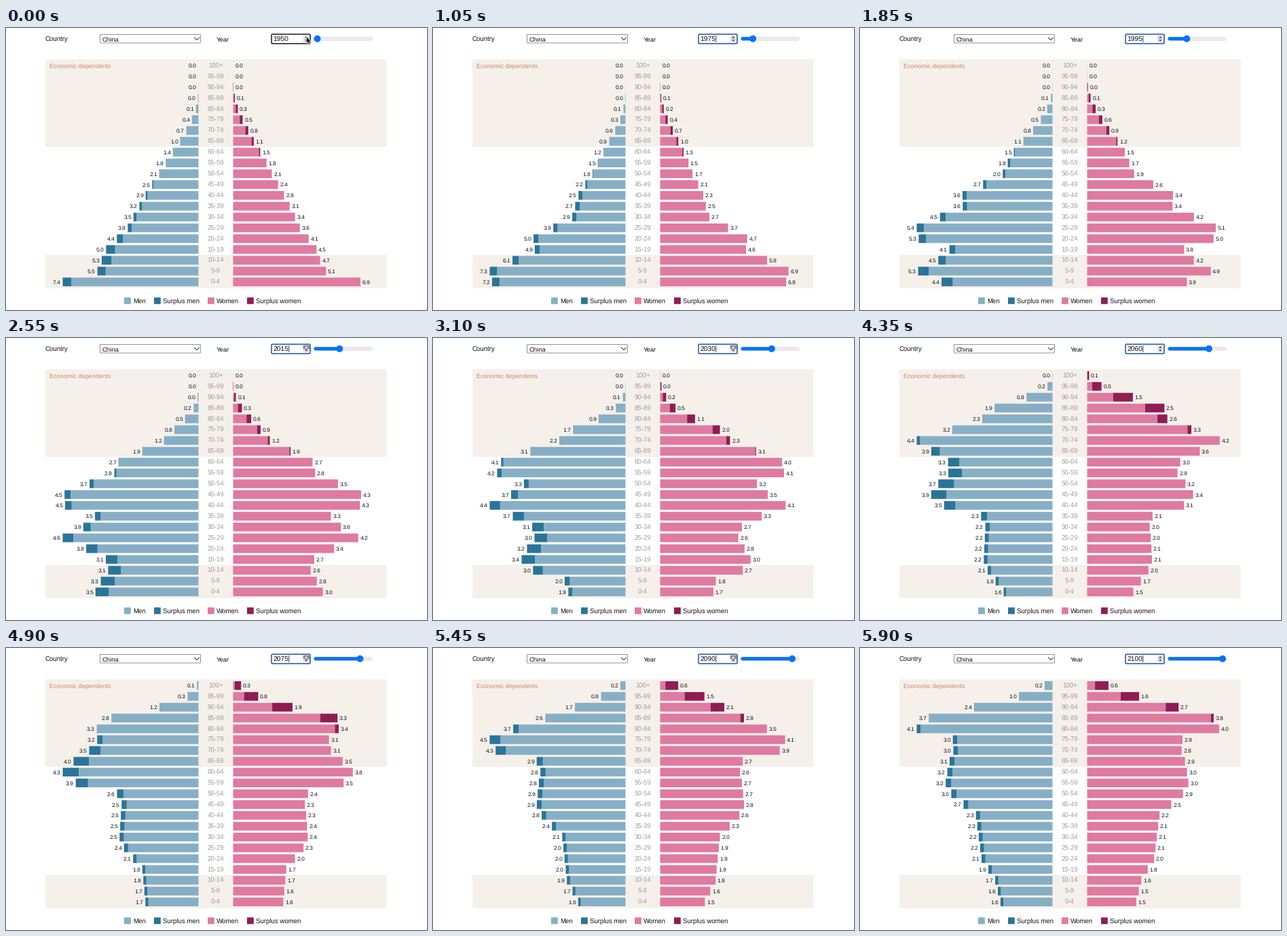
Write a matplotlib script that moves like this. It is 620x415 px and loops after 6050 ms.

```python
import numpy as np
import matplotlib.pyplot as plt
from matplotlib.animation import FuncAnimation
from matplotlib.patches import Circle, FancyBboxPatch, Polygon, Rectangle

W, H, DPI = 620, 415, 100
STEP, LOOP = 50, 6050
FIRST, BEAT = 144, 196.35       # first five-year step and pace, ms
AGES = 21
MEN_X, WOMEN_X, MAX_BAR = 283.5, 334.5, 200
BLUE, NAVY, PINK, WINE = "#86afc5", "#2b7499", "#df7aa1", "#8f1d54"
PANEL, INK, ACCENT = "#f5f0ea", "#111111", "#0a72f5"

# Turning points of the male birth cohorts: (year, millions).
BIRTHS = [(1870, 9), (1885, 10.5), (1900, 14), (1925, 21.8), (1935, 28.2),
          (1945, 30.7), (1950, 41.2), (1955, 51), (1960, 49), (1965, 59.5),
          (1970, 69.8), (1975, 67), (1980, 51.5), (1985, 57), (1990, 67),
          (1995, 55.3), (2000, 45.6), (2005, 44.4), (2010, 48),
          (2015, 50.6), (2020, 45), (2025, 29.6), (2030, 27.8),
          (2045, 28.4), (2050, 26.8), (2060, 20.2), (2080, 18.7),
          (2090, 15.1), (2100, 13.7)]


def bump(x, centre, width):
    return np.exp(-((x - centre) / width) ** 2)


def pyramid(year):
    """Shares (%) of men and women by age group: births times survival."""
    age = 5 * np.arange(AGES)
    born = year - age
    boys = np.interp(born, *zip(*BIRTHS))
    girls = boys * (.945 - .09 * bump(born, 2008, 16)
                    - .05 * bump(born, 1938, 9))

    # Extra losses up to 1975, then Gompertz mortality that eases over time.
    hard = .0045 * np.maximum(min(year, 1975) - np.maximum(born, 1950), 0)
    era = max(year, 1975)
    slope = .09 + .00032 * (era - 1975)
    gain = .145 * (era - 2025)

    def alive(extra):
        risk = 2.5 * np.exp(slope * (age + 2.5 - gain - extra - 90))
        return np.exp(-risk - hard)

    people = np.array([boys * alive(0), girls * alive(3.5)])
    return 100 * people / people.sum()


def steps_done(t):
    return int((t - FIRST) // BEAT) + 1 if t >= FIRST else 0


plt.rcParams["font.family"] = "Liberation Sans"
plt.rcParams["text.hinting"] = "none"
fig = plt.figure(figsize=(W / DPI, H / DPI), dpi=DPI, facecolor="white")
ax = fig.add_axes([0, 0, 1, 1])
ax.set_xlim(0, W)
ax.set_ylim(H, 0)
ax.axis("off")


def px(size):
    return size * 72 / DPI


def label(x, yc, s, size, color=INK, ha="left"):
    """Text whose digits are centred on yc."""
    return ax.text(x, yc + .36 * size, s, fontsize=px(size), color=color,
                   ha=ha, va="baseline", zorder=5)


def box(x, y, w, h, color, z=2):
    return ax.add_patch(Rectangle((x, y), w, h, fc=color, lw=0, zorder=z,
                                  snap=False))


def rounded(x, y, w, h, r, fc, ec="none", lw=0, z=3):
    style = f"round,pad=0,rounding_size={r}"
    return ax.add_patch(FancyBboxPatch((x, y), w, h, boxstyle=style, fc=fc,
                                       ec=ec, lw=px(lw), zorder=z))


def shape(points, fc, ec="none", lw=0, z=6):
    return ax.add_patch(Polygon(points, closed=True, fc=fc, ec=ec,
                                lw=px(lw), zorder=z))


# Controls
label(58, 16, "Country", 9.7)
rounded(138.5, 9.5, 148, 12.5, 1, "white", "#929292", 1)
label(141.8, 16, "China", 9.5)
ax.plot([277.5, 281, 284.5], [14.2, 17.6, 14.2], color="#333333",
        lw=px(1), zorder=5)
label(310, 16, "Year", 9.5)
field = rounded(391, 9.2, 57, 13.8, 1.5, "white", "#333333", 1.7)
year_text = label(393.5, 16, "", 10.2)
caret = box(416.3, 11, .9, 10, "#222222", 5)
rounded(437.5, 10.7, 9.5, 10.4, 1.5, "#e4e4e4", z=4)
pressed = rounded(437.5, 10.7, 9.5, 5.6, 1.5, "#8c8c8c", z=5)
up = shape([(440, 14.8), (444.4, 14.8), (442.2, 12.2)], "#444444")
shape([(440, 17.2), (444.4, 17.2), (442.2, 19.8)], "#444444")
cursor = shape([(442.5, 12.5), (442.5, 23), (444.8, 20.9), (446.4, 24.6),
                (448, 23.9), (446.4, 20.4), (449.4, 20.2)],
               "black", "white", .7, 9)

rounded(453.5, 13.3, 86, 5, 2.5, "#ebebeb", "#dddddd", .6)
fill = rounded(453.5, 13.2, 5, 5.2, 2.5, ACCENT, z=4)
thumb = ax.add_patch(Circle((458.5, 15.8), 5, fc=ACCENT, lw=0, zorder=5))

# Chart
box(58, 46, 502.5, 129, PANEL, 1)
box(58, 334, 502.5, 49, PANEL, 1)
label(64, 56.2, "Economic dependents", 9.1, "#cd8a6c")

rows = []
for a in range(AGES):
    y = 373.7 - 15.92 * a
    name = "100+" if a == AGES - 1 else f"{5 * a}-{5 * a + 4}"
    label(309, y, name, 9.7, "#a0a0a0", "center")
    bars = [box(0, y - 6.4, 0, 12.8, c) for c in (BLUE, NAVY, PINK, WINE)]
    rows.append((bars, label(0, y, "", 8.5, ha="right"),
                 label(0, y, "", 8.5)))

for x, color, name in [(174, BLUE, "Men"), (218, NAVY, "Surplus men"),
                       (297, PINK, "Women"), (355, WINE, "Surplus women")]:
    box(x, 396.5, 9.8, 9.8, color)
    label(x + 13, 401.3, name, 9.7)


def place(bar, x0, x1):
    bar.set_x(x0)
    bar.set_width(x1 - x0)


def draw(i):
    t = i * STEP
    n = steps_done(t)
    year = 1950 + 5 * n

    year_text.set_text(str(year))
    field.set_edgecolor("#3566b4" if n else "#333333")
    caret.set_visible(n > 0)
    cursor.set_visible(n == 0)
    down = n != steps_done(t - STEP)
    pressed.set_visible(down)
    up.set_facecolor("white" if down else "#444444")
    knob = 458.5 + 75.5 * (year - 1950) / 150
    thumb.center = (knob, 15.8)
    fill.set_width(knob - 453.5)

    men, women = pyramid(year)
    scale = MAX_BAR / max(men.max(), women.max())
    for (bars, left, right), m, w in zip(rows, men, women):
        common = min(m, w) * scale
        end_m, end_w = MEN_X - m * scale, WOMEN_X + w * scale
        place(bars[0], MEN_X - common, MEN_X)
        place(bars[1], end_m, MEN_X - common)
        place(bars[2], WOMEN_X, WOMEN_X + common)
        place(bars[3], WOMEN_X + common, end_w)
        left.set_text(f"{m:.1f}")
        left.set_x(end_m - 2.7)
        right.set_text(f"{w:.1f}")
        right.set_x(end_w + 2.7)
    return []


anim = FuncAnimation(fig, draw, frames=LOOP // STEP, interval=STEP,
                     init_func=lambda: draw(0), repeat=True, repeat_delay=0,
                     cache_frame_data=False)
plt.show()
```
